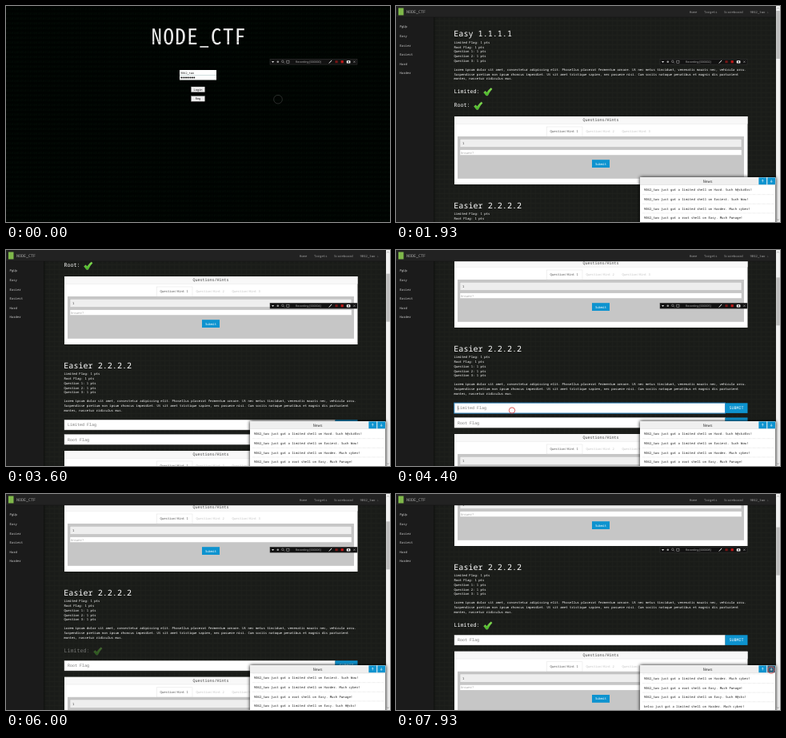
An HTML page for the animation above (8000 ms loop, 480 by 270 pixels).

```html
<!DOCTYPE html>
<html lang="en">
<head>
<meta charset="utf-8">
<title>NODE_CTF</title>
<style>
html, body { margin: 0; width: 100%; height: 100%; overflow: hidden; background: #000; }
svg { display: block; width: 480px; height: 270px; }
text { font-family: "Noto Sans Mono", "DejaVu Sans Mono", monospace; text-rendering: geometricPrecision; white-space: pre; }
.sans { font-family: "Open Sans", "Noto Sans", sans-serif; }
#title { font-family: "Noto Sans Mono CJK JP", "Noto Sans Mono", monospace; }
#news { filter: drop-shadow(0 0 2px #000); }
</style>
</head>
<body>
<svg id="stage" viewBox="0 0 480 270"></svg>
<script>
const LOOP = 8000, BODY = 3.96, BLUE = '#0d93cf', USER = '9042_two';

const rect = (x, y, w, h, fill, extra = '') =>
  `<rect x="${x}" y="${y}" width="${w}" height="${h}" fill="${fill}" ${extra}/>`;
const text = (x, y, s, fill, size = BODY, extra = '') =>
  `<text x="${x}" y="${y}" fill="${fill}" font-size="${size}" ${extra}>${s}</text>`;
const mid = 'text-anchor="middle"';
const path = (d, stroke, width = .7) =>
  `<path d="${d}" fill="none" stroke="${stroke}" stroke-width="${width}"/>`;
const group = (id, body, extra = '') => `<g id="${id}" ${extra}>${body}</g>`;

const check = (x, y) =>
  `<path transform="translate(${x} ${y})" d="M.2 5.6 L2.4 4 L4.2 6 Q6.4 2.2 9.4 .2 L10.8 1.4 Q7.4 5 5.4 9.6 L3.4 9.8 Z" fill="url(#tick)" stroke="#a6e884" stroke-width=".3"/>`;

const done = (y, label) =>
  text(72.5, y, label, '#fff', 6.7) + check(72.5 + 4.02 * label.length + 4.7, y - 6.2);

const lorem = [
  'Lorem ipsum dolor sit amet, consectetur adipiscing elit. Phasellus placerat fermentum ornare. Ut nec metus tincidunt, venenatis mauris nec, vehicula arcu.',
  'Suspendisse pretium non ipsum rhoncus imperdiet. Ut sit amet tristique sapien, nec posuere nisi. Cum sociis natoque penatibus et magnis dis parturient',
  'montes, nascetur ridiculus mus.'
];
const points = ['Limited Flag', 'Root Flag', 'Question 1', 'Question 2', 'Question 3'];

const intro = (y, title) =>
  text(72.3, y + 38, title, '#fff', 10.1) +
  points.map((p, i) => text(72.4, y + 46.9 + 5.75 * i, p + ': 1 pts', '#fff')).join('') +
  lorem.map((l, i) => text(72.4, y + 80.7 + 5.8 * i, l, '#fff')).join('');

const panel = y =>
  rect(73, y, 366.5, 85, '#fff') + rect(73, y, 366.5, 9, '#f8f8f8') + rect(73, y + 9, 366.5, .4, '#ddd') +
  text(256, y + 6.2, 'Questions/Hints', '#444', 5, mid) +
  rect(77, y + 25, 358, 52.8, '#c6c6c6') +
  rect(188.7, y + 13, 44.3, 12, '#fff', 'stroke="#ddd" stroke-width=".4"') +
  [1, 2, 3].map(n => text(147.4 + 45 * n, y + 20, 'Question/Hint ' + n, n == 1 ? '#555' : '#c4c4c4')).join('') +
  rect(80, y + 28.2, 352, 10.4, '#eee', 'stroke="#aaa" stroke-width=".4"') +
  text(83, y + 34.8, '1', '#333') +
  rect(80, y + 41.8, 352, 6.6, '#fff', 'stroke="#bbb" stroke-width=".3"') +
  text(80.8, y + 46.5, 'Answer?', '#aaa') +
  rect(245, y + 54.2, 22, 9.8, BLUE) + text(256, y + 60.5, 'Submit', '#fff', BODY, mid);

const flagRow = (y, label) =>
  rect(73, y, 338.5, 12.6, '#fff', 'stroke="#ccc" stroke-width=".4"') +
  text(77, y + 8, label, '#777', 5) +
  rect(411.5, y, 28, 12.6, BLUE) + text(425.5, y + 8, 'SUBMIT', '#fff', 5, mid);

// letter spacing that keeps the title on its 14.9 px grid
const pen = document.createElement('canvas').getContext('2d');
pen.font = '27px "Noto Sans Mono CJK JP", "Noto Sans Mono", monospace';
const spacing = 14.9 - pen.measureText('N').width;

const defs = `<defs>
  <linearGradient id="tick" x2="0" y2="1"><stop stop-color="#86e84c"/><stop offset="1" stop-color="#3dad22"/></linearGradient>
  <pattern id="weave" width="6" height="6" patternUnits="userSpaceOnUse">
    ${rect(0, 0, 6, 6, '#1a1c19')}${rect(0, 0, 6, .8, '#1e201c')}${rect(0, 0, .8, 6, '#1d1f1b')}${rect(3, 3, 1.5, .8, '#171916')}
  </pattern>
  <pattern id="code" width="23" height="6" patternUnits="userSpaceOnUse">
    ${rect(0, 0, 23, 6, '#000301')}${text(0, 4.5, '0110100101', '#030d06', 3.8)}
  </pattern>
  <linearGradient id="edge"><stop stop-color="#000" stop-opacity=".45"/><stop offset="1" stop-color="#000" stop-opacity="0"/></linearGradient>
  <clipPath id="view">${rect(0, 14, 475, 256, '#000')}</clipPath>
  <clipPath id="list">${rect(305, 224, 170, 46, '#000')}</clipPath>
  <clipPath id="band0">${rect(0, 20, 480, 14, '#000')}</clipPath>
  <clipPath id="band1">${rect(0, 34, 480, 10.5, '#000')}</clipPath>
  <clipPath id="band2">${rect(0, 44.5, 480, 16, '#000')}</clipPath>
  ${text(181.5, 48, 'NODE_CTF', '#eee', 27, `id="title" letter-spacing="${spacing}"`)}
</defs>`;

const button = (y, label) =>
  rect(231.5, y, 17, 6.6, '#eee', 'stroke="#999" stroke-width=".3"') + text(240, y + 4.6, label, '#222', 3.7, mid);

const login = group('login',
  rect(0, 0, 480, 270, 'url(#code)') +
  [0, 1, 2].map(i => `<g clip-path="url(#band${i})"><use href="#title" id="slice${i}"/></g>`).join('') +
  rect(217, 80, 46, 12.5, '#fff') + rect(217, 86.1, 46, .4, '#8aa') +
  text(218, 84.5, USER, '#222', 3.6) +
  Array.from({length: 8}, (_, i) => `<circle cx="${219.2 + 2.3 * i}" cy="89.5" r=".95" fill="#111"/>`).join('') +
  button(101, 'Login') + button(112.6, 'Reg') +
  group('reply',
    text(240, 127.7, 'True', '#eee', BODY, mid) +
    rect(-1, 263.5, 83.5, 8, '#ececec', 'stroke="#aaa" stroke-width=".4" rx=".8"') +
    text(1, 268.3, 'Waiting for localhost...', '#555', 3.3, 'class="sans"')));

const shell = (who, kind, rest) => `${who} just got a ${kind} shell on ${rest}!`;
const news = [
  shell(USER, 'limited', 'Hard. Such h@ckz0rs'),
  shell(USER, 'limited', 'Easiest. Such Wow'),
  shell(USER, 'limited', 'Harder. Much cyber'),
  shell(USER, 'root', 'Easy. Much Pwnage'),
  shell(USER, 'limited', 'Easy. Such H@cks'),
  shell('kelvo', 'limited', 'Harder. Much cyber')
];
const ROW = 11.6;

const newsBox = group('news',
  rect(305, 214, 169.5, 58, '#fff', 'rx="1"') + rect(305, 214, 169.5, 9.6, '#efefef', 'rx="1"') +
  rect(305, 223.5, 169.5, .4, '#ccc') + text(389.7, 220.7, 'News', '#444', 5, mid) +
  rect(453.4, 214.4, 9.8, 8.8, BLUE) + rect(464.3, 214.4, 9.8, 8.8, BLUE, 'id="down"') +
  path('M458.3 220.3V217.2M457.2 218.3L458.3 217.2L459.4 218.3M469.2 217.2V220.3M468.1 219.2L469.2 220.3L470.3 219.2', '#fff', .6) +
  `<g clip-path="url(#list)">` + group('rows', news.map((n, i) =>
    text(309.8, 231.4 + ROW * i, n, '#222') +
    `<path d="M308 ${235.7 + ROW * i}H472" stroke="#bbb" stroke-width=".4" stroke-dasharray=".6 .6"/>`).join('')) + '</g>');

const side = ['PgUp', 'Easy', 'Easier', 'Easiest', 'Hard', 'Harder'];
const links = [[366.8, 'Home'], [385, 'Targets'], [410, 'Scoreboard'], [442.5, USER + ' ↓']];

const app = group('app',
  rect(0, 0, 480, 270, 'url(#weave)') +
  `<g clip-path="url(#view)">` + group('doc',
    intro(0, 'Easy 1.1.1.1') + done(108.5, 'Limited:') + done(126, 'Root:') + panel(138) +
    intro(214.5, 'Easier 2.2.2.2') +
    group('flag', flagRow(317.3, 'Limited Flag') +
      group('focus', rect(72.8, 317.1, 338.7, 13, 'none', 'stroke="#2f8fd0" stroke-width=".9"') + rect(77, 320.6, .4, 6, '#222'))) +
    group('solved', done(323.7, 'Limited:')) +
    group('lower', flagRow(335.5, 'Root Flag') + panel(356))) + '</g>' +
  rect(0, 14, 47, 256, '#1b1b1b') + rect(47, 14, 3, 256, 'url(#edge)') +
  side.map((s, i) => text(4.5, 27.4 + 11.6 * i, s, '#ccc')).join('') +
  rect(0, 0, 475, 14, '#222') + rect(0, 13.7, 475, .5, '#111') +
  rect(3, 2.5, 6.5, 9, '#7fb84a') +
  text(13, 9, 'NODE_CTF', '#aaa', 5) + links.map(([x, s]) => text(x, 8.6, s, '#999')).join('') +
  rect(475, 0, 5, 270, '#f1f1f1') + rect(475.3, 6, 4.4, 60, '#bdbdbd', 'id="thumb"') +
  path('M476.3 3.5L477.5 2.2L478.7 3.5M476.3 266.5L477.5 267.8L478.7 266.5', '#666', .5) +
  newsBox);

const toolbar = group('toolbar',
  rect(330, 66.3, 109, 6.8, '#121212', 'stroke="#3a3a3a" stroke-width=".5"') +
  '<path d="M332 68.9h3.2l-1.6 2z" fill="#ddd"/>' +
  '<circle cx="339.8" cy="69.7" r="1.3" fill="#999"/>' +
  '<circle cx="345.8" cy="69.3" r="1.3" fill="none" stroke="#bbb" stroke-width=".5"/>' +
  path('M346.8 70.3L348 71.5', '#bbb', .6) +
  rect(350.8, 68.2, 3.2, 3, 'none', 'stroke="#bbb" stroke-width=".5"') +
  text(362, 70.9, '', '#bbb', 3.5, 'id="count" class="sans"') +
  path('M403.8 71.5L407.2 67.9', '#eee', 1) +
  rect(411.8, 68.2, 1, 3, '#b01818') + rect(413.5, 68.2, 1, 3, '#b01818') + rect(418.6, 68.1, 3.2, 3.2, '#c01818') +
  rect(425.8, 68.2, 4.6, 3.2, '#fff', 'rx=".5"') + '<circle cx="428.1" cy="69.8" r=".9" fill="#222"/>' +
  path('M434.3 68.5L436.5 70.9M436.5 68.5L434.3 70.9', '#bbb', .5));

const stage = document.getElementById('stage');
stage.innerHTML = defs + login + app + toolbar + '<circle id="ring" fill="none" stroke-width=".9"/>';

const $ = id => document.getElementById(id);
const show = (id, on) => $(id).setAttribute('visibility', on ? 'inherit' : 'hidden');
const move = (id, x, y) => $(id).setAttribute('transform', `translate(${x} ${y})`);
const clamp = v => Math.min(1, Math.max(0, v));
const swing = (t, start, span) => .5 - Math.cos(Math.PI * clamp((t - start) / span)) / 2;

// Linear interpolation through [time, value] keys.
function follow(t, keys) {
  const i = keys.findIndex(k => k[0] > t);
  if (i < 0) return keys[keys.length - 1][1];
  const [t0, a] = keys[i - 1], [t1, b] = keys[i];
  return a + (b - a) * (t - t0) / (t1 - t0);
}

const scrollKeys = [[0, 0], [3000, 0], [3600, 105], [3930, 126], [6730, 126], [7530, 158]];

// Each click flashes a growing ring: time, x, y.
const CLICK = 200;
const clicks = [[-130, 340, 116.7], [930, 241.5, 102.7], [4350, 145, 200.5], [5530, 425, 198], [7860, 469, 220]];

function drawRing(t) {
  const hit = clicks.find(([at]) => t >= at && t < at + CLICK);
  show('ring', hit);
  if (!hit) return;
  const p = (t - hit[0]) / CLICK, ring = $('ring');
  ring.setAttribute('cx', hit[1]);
  ring.setAttribute('cy', hit[2]);
  ring.setAttribute('r', 2.6 + 4.2 * p);
  ring.setAttribute('stroke', p < .5 ? '#d84848' : 'rgba(130,130,130,.35)');
}

function draw(t) {
  const onApp = t >= 1530;
  show('login', !onApp);
  show('app', onApp);

  // title glitch
  const k = t < 270 ? 0 : Math.floor((t > 1070 && t < 1270 ? 1070 : t) / 67);
  move('slice1', Math.sin(k * 5) * .4, 0);
  move('slice2', Math.sin(k * 7) * 1.2, 0);
  show('reply', t >= 1000);

  const scroll = follow(t, scrollKeys);
  move('doc', 0, -scroll);
  move('thumb', 0, scroll * .225);

  const solved = t >= 5800;
  show('flag', !solved);
  $('flag').setAttribute('opacity', 1 - swing(t, 5550, 250));
  show('focus', t >= 4350 && t < 5530);
  $('solved').setAttribute('opacity', swing(t, 5800, 470));
  move('lower', 0, solved ? -1.2 : 0);

  move('rows', 0, -ROW * (swing(t, 4750, 400) + swing(t, 7600, 400)));
  $('down').setAttribute('fill', t >= 6500 ? '#2c637e' : BLUE);

  $('count').textContent = `Recording [${String(Math.floor((t + 930) / 1000)).padStart(6, '0')}]`;
  drawRing(t);
}

let start;
function tick(now) {
  start ??= now;
  draw((now - start) % LOOP);
  requestAnimationFrame(tick);
}
draw(0);
requestAnimationFrame(tick);
</script>
</body>
</html>
```
